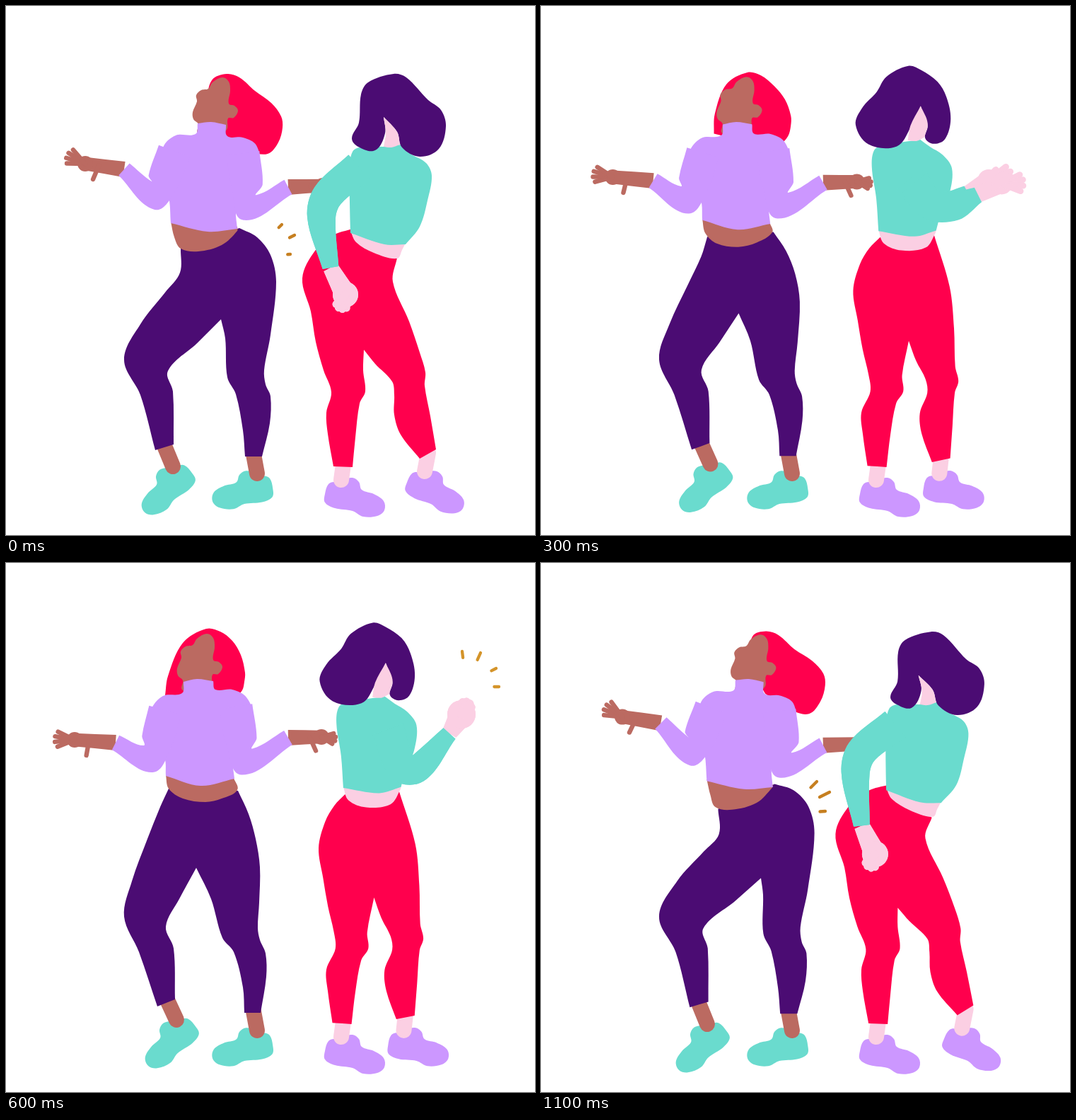
Write an HTML page with a canvas that moves like this. It is 748 px wide and 748 px high and loops after 1200 ms.

```html
<!DOCTYPE html>
<html lang="en">
<head>
<meta charset="utf-8">
<title>Two dancers</title>
<style>
html, body { margin: 0; width: 100%; height: 100%; overflow: hidden; background: #fff; }
canvas { display: block; width: 748px; height: 748px; }
</style>
</head>
<body>
<canvas id="stage" width="748" height="748"></canvas>
<script>
const ctx = document.getElementById('stage').getContext('2d');
const PLUM = '#4b0c73', LILAC = '#cc97ff', TEAL = '#6adbce', RED = '#ff004d',
  BROWN = '#bb6a61', PINK = '#fbcfe3', GOLD = '#d4942a', OCHRE = '#c67f20';
const SLEEVE = [47, 44, 40, 23];
const rad = deg => deg * Math.PI / 180;

// "x,y" pairs; a trailing "!" doubles the point to make a sharp corner
const parse = s => s.split(' ').flatMap(w => {
  const p = w.replace('!', '').split(',').map(Number);
  return w.endsWith('!') ? [...p, ...p] : p;
});
const pose = parts =>
  Object.fromEntries(Object.entries(parts).map(([k, v]) => [k, parse(v)]));
// t may run past 0 or 1 to push a pose further
const mix = (a, b, t) =>
  Object.fromEntries(Object.keys(a).map(k => [k, a[k].map((v, i) => v + (b[k][i] - v) * t)]));

// hand: palm x, y, radius, finger angle, finger length, thumb angle
// foot: hem x, y, shoe x, y, angle
const leftLean = pose({
  hair: '290,165! 285,135 291,105 312,96 330,101 352,120 375,137 389,156 391,172 385,193 370,209 345,205 310,186!',
  head: '0,0',
  armL: '238,205 221,250 208,268 167,231', armR: '335,208 341,255 345,285 399,256',
  handL: '112,223 11,205 18,-92', handR: '448,254 11,8 10,58',
  top: '271,166! 290,164 311,168! 313,184 335,186 354,197 357,225 330,260 325,290 327,315! 285,319 233,307! 230,270 218,240 222,200 240,183 268,181',
  belly: '233,305! 327,312! 327,318 305,338 272,347 247,343 238,327',
  pants: '247,343! 330,314! 355,327 374,352 382,390 374,465 365,515 367,535 374,552 373,590 362,637! 338,637! 335,600 325,549 313,525 310,470 304,443! 270,477 229,516 236,545 237,620! 211,628! 190,550 167,500 190,450 225,405 246,377',
  foot: '224,622 236,657 -25'
});
const leftFront = pose({
  hair: '225,187! 229,160 250,113 283,93 303,97 320,110 332,130 338,155 337,168 334,180 325,188 305,192 275,192!',
  head: '-22,-1',
  armL: '225,208 213,252 201,277 155,254', armR: '325,203 333,252 341,281 399,247',
  handL: '97,250 11,182 18,-82', handR: '446,246 11,8 10,58',
  top: '251,168! 270,164 293,167! 296,179 320,179 340,190 349,218 327,255 321,282 323,305! 275,315 226,301! 224,275 203,240 205,208 222,188 249,184',
  belly: '226,300! 322,304! 327,321 305,333 282,338 250,333 230,319',
  pants: '230,319! 328,322! 343,355 353,390 359,430 358,480 356,516 359,533 367,552 368,585 360,636! 337,636! 335,600 322,550 306,530 290,475 269,431! 245,475 226,514 237,545 239,617! 214,627! 188,550 167,500 178,450 200,390 218,345',
  foot: '228,618 241,652 -25'
});
const rightLean = pose({
  hair: '502,125 512,108 548,96 566,101 597,133 615,147 622,170 612,202 585,213 560,200 553,178 534,157! 536,180 522,204 498,199 489,187 499,165',
  face: '534,157! 553,178 557,196! 545,200 534,199! 537,180',
  top: '533,199! 558,196! 572,209 594,222 602,240 596,275 585,312 565,337! 535,337 487,321! 486,278 486,235 490,206 505,199',
  belly: '487,318! 565,335! 560,345 553,357 520,349 495,334',
  pants: '490,315! 463,324 437,346 419,385 431,432 438,475 449,515 460,546 453,575 455,605 463,651! 490,652! 494,610 500,562 508,545 505,515 506,486! 522,506 546,531 549,550 549,578 558,606 585,640! 608,627! 600,580 592,537 593,518 585,490 570,446 547,390 553,356! 520,345',
  foot: '597,632 592,664 10'
});
const rightTurn = pose({
  hair: '463,120 478,97 507,80 525,86 545,96 555,120 561,155 554,182 543,187 536,181 544,165 538,135! 516,170 495,196 448,194 426,160 435,135',
  face: '538,135! 544,160 536,181! 525,187 512,186! 516,165',
  top: '513,188! 527,186! 541,195 556,205 572,225 570,260 556,290 556,309! 525,321 473,317! 469,270 460,225 463,203 475,196',
  belly: '473,316! 557,305! 556,312 540,335 505,344 480,336',
  pants: '475,332! 465,350 457,373 451,410 455,450 462,490 469,523 468,545 453,575 455,605 461,650! 488,652! 494,605 503,562 514,545 513,525 526,468! 534,500 543,527 545,546 530,575 530,605 539,647! 566,645! 574,600 582,552 589,536 586,518 590,460 591,400 557,310! 520,340',
  foot: '552,645 551,668 -8'
});

// Arm gestures of the right dancer; both arms coincide unless told otherwise
const gesture = (arm, hand, arm2 = arm, hand2 = hand) => pose({ arm, hand, arm2, hand2 });
const rest = gesture('500,228 455,268 446,300 459,370', '480,408 18,110 4,0');
const reach = gesture('488,225 465,285 460,322 514,357', '556,371 13,70 18,0');
const out = gesture('510,265 511,318 535,338 590,344', '645,348 14,62 15,0');
const raise = gesture('530,226 580,232 606,228 618,185', '621,145 17,-90 22,-65',
  '545,235 595,245 637,228 646,190', '658,155 16,-68 18,-65');
const clap = gesture('540,235 560,288 583,290 627,241', '644,214 20,-60 0,0');

const HEAD = parse('306,101 315,107 317,120 315,138 323,141 328,148 322,158 314,159 312,175 290,188 271,180 272,167 265,160 264,150 270,135 269,126 276,119 286,117 292,108');
const SHOE = parse('-23,14 -18,0 -9,-3 -4,2 4,-6 16,-9 25,-3 29,8 46,14 60,24 61,37 51,45 31,46 16,38 -9,34 -23,26');

function blob(p, color) {
  const n = p.length / 2;
  const at = i => { i = (i + n) % n; return [p[2 * i], p[2 * i + 1]]; };
  const pull = (a, b, len) => {
    const dx = b[0] - a[0], dy = b[1] - a[1], k = len / 3 / (Math.hypot(dx, dy) || 1);
    return [dx * k, dy * k];
  };
  ctx.fillStyle = color;
  ctx.beginPath();
  ctx.moveTo(p[0], p[1]);
  for (let i = 0; i < n; i++) {
    const a = at(i - 1), b = at(i), c = at(i + 1), d = at(i + 2);
    const len = Math.hypot(c[0] - b[0], c[1] - b[1]);
    if (len < .01) continue;
    const u = pull(a, c, len), v = pull(b, d, len);
    ctx.bezierCurveTo(b[0] + u[0], b[1] + u[1], c[0] - v[0], c[1] - v[1], c[0], c[1]);
  }
  ctx.fill();
}

// Tapered tube with flat ends along a chain of joints
function limb(p, widths, color) {
  const last = widths.length - 1;
  const dir = i => {
    const dx = p[2 * i + 2] - p[2 * i], dy = p[2 * i + 3] - p[2 * i + 1], d = Math.hypot(dx, dy) || 1;
    return [dx / d, dy / d];
  };
  let near = [], far = [];
  widths.forEach((w, i) => {
    const a = dir(Math.max(i - 1, 0)), b = dir(Math.min(i, last - 1));
    const dx = a[0] + b[0], dy = a[1] + b[1], k = w / 2 / (Math.hypot(dx, dy) || 1);
    const x = p[2 * i], y = p[2 * i + 1];
    const turns = i % last ? 1 : 2;
    for (let n = 0; n < turns; n++) {
      near = [...near, x + dy * k, y - dx * k];
      far = [x - dy * k, y + dx * k, ...far];
    }
  });
  blob([...near, ...far], color);
}

function line(x, y, x2, y2, color, width) {
  ctx.strokeStyle = color;
  ctx.lineWidth = width;
  ctx.lineCap = 'round';
  ctx.beginPath();
  ctx.moveTo(x, y);
  ctx.lineTo(x2, y2);
  ctx.stroke();
}

function hand(arm, [x, y, r, angle, len, thumb], color) {
  const [wx, wy] = arm.slice(-2);
  const finger = (fx, fy, deg, size) =>
    line(fx, fy, fx + Math.cos(rad(deg)) * size, fy + Math.sin(rad(deg)) * size, color, r * .58);
  limb([wx, wy, x, y], [22, r * 1.7], color);
  ctx.beginPath();
  ctx.arc(x, y, r, 0, 7);
  ctx.fill();
  for (let i = -1.5; i < 2; i++) finger(x, y, angle + i * 16, r + len - Math.abs(i) * 2);
  if (Math.abs(thumb) > 20) finger(x + (wx - x) * .35, y + (wy - y) * .35, angle + thumb, r * 1.9);
}

function foot([hx, hy, x, y, angle], flip, color, skin) {
  ctx.save();
  ctx.translate(x, y);
  ctx.rotate(rad(angle));
  ctx.scale(flip, 1);
  blob(SHOE, color);
  ctx.restore();
  line(hx, hy, x, y - 6, skin, 22);
}

function drawLeft(p) {
  blob(p.hair, RED);
  ctx.save();
  ctx.translate(...p.head);
  blob(HEAD, BROWN);
  ctx.restore();
  hand(p.armL, p.handL, BROWN);
  hand(p.armR, p.handR, BROWN);
  foot(p.foot, -1, TEAL, BROWN);
  foot([350, 634, 355, 667, 3], -1, TEAL, BROWN);
  blob(p.pants, PLUM);
  blob(p.belly, BROWN);
  blob(p.top, LILAC);
  limb(p.armL, SLEEVE, LILAC);
  limb(p.armR, SLEEVE, LILAC);
}

function drawRight(p, g) {
  foot([477, 648, 474, 676, 0], 1, LILAC, PINK);
  foot(p.foot, 1, LILAC, PINK);
  blob(p.pants, RED);
  blob(p.belly, PINK);
  hand(g.arm, g.hand, PINK);
  hand(g.arm2, g.hand2, PINK);
  blob(p.top, TEAL);
  limb(g.arm, SLEEVE, TEAL);
  limb(g.arm2, SLEEVE, TEAL);
  blob(p.hair, PLUM);
  blob(p.face, PINK);
}

// Rays: outer end and inward vector
const hipRays = [[390, 309, -17, 17], [408, 324, -28, 14], [402, 351, -15, 1]];
const clapRays = [[645, 125, 1, 8], [671, 127, -4, 9], [693, 149, -6, 3], [697, 175, -6, 0]];
const rays = (list, size, color) =>
  list.forEach(([x, y, dx, dy]) => line(x, y, x + dx * size, y + dy * size, color, 4.3));

// One entry per beat of 100 ms
const leftTurns = [0, .25, .4, .7, 1, 1, 1, .7, .4, .25, 0, -.2];
const rightTurns = [0, .2, .4, .7, 1, .85, .72, .55, .4, .2, 0, -.08];
const gestures = [rest, reach, out, mix(out, raise, .5), raise, mix(raise, clap, .8),
  clap, mix(clap, out, .5), out, reach, rest, mix(rest, reach, -.1)];

function frame(now) {
  const beat = Math.floor(now % 1200 / 100);
  ctx.fillStyle = '#fff';
  ctx.fillRect(0, 0, 748, 748);
  drawLeft(mix(leftLean, leftFront, leftTurns[beat]));
  drawRight(mix(rightLean, rightTurn, rightTurns[beat]), gestures[beat]);
  const sinceHip = (beat + 3) % 12, sinceClap = beat - 5;
  if (sinceHip < 4) rays(hipRays, 1 - sinceHip * .25, OCHRE);
  if (sinceClap >= 0 && sinceClap < 3) rays(clapRays, 2 - sinceClap * .9, GOLD);
  requestAnimationFrame(frame);
}
requestAnimationFrame(frame);
</script>
</body>
</html>
```
